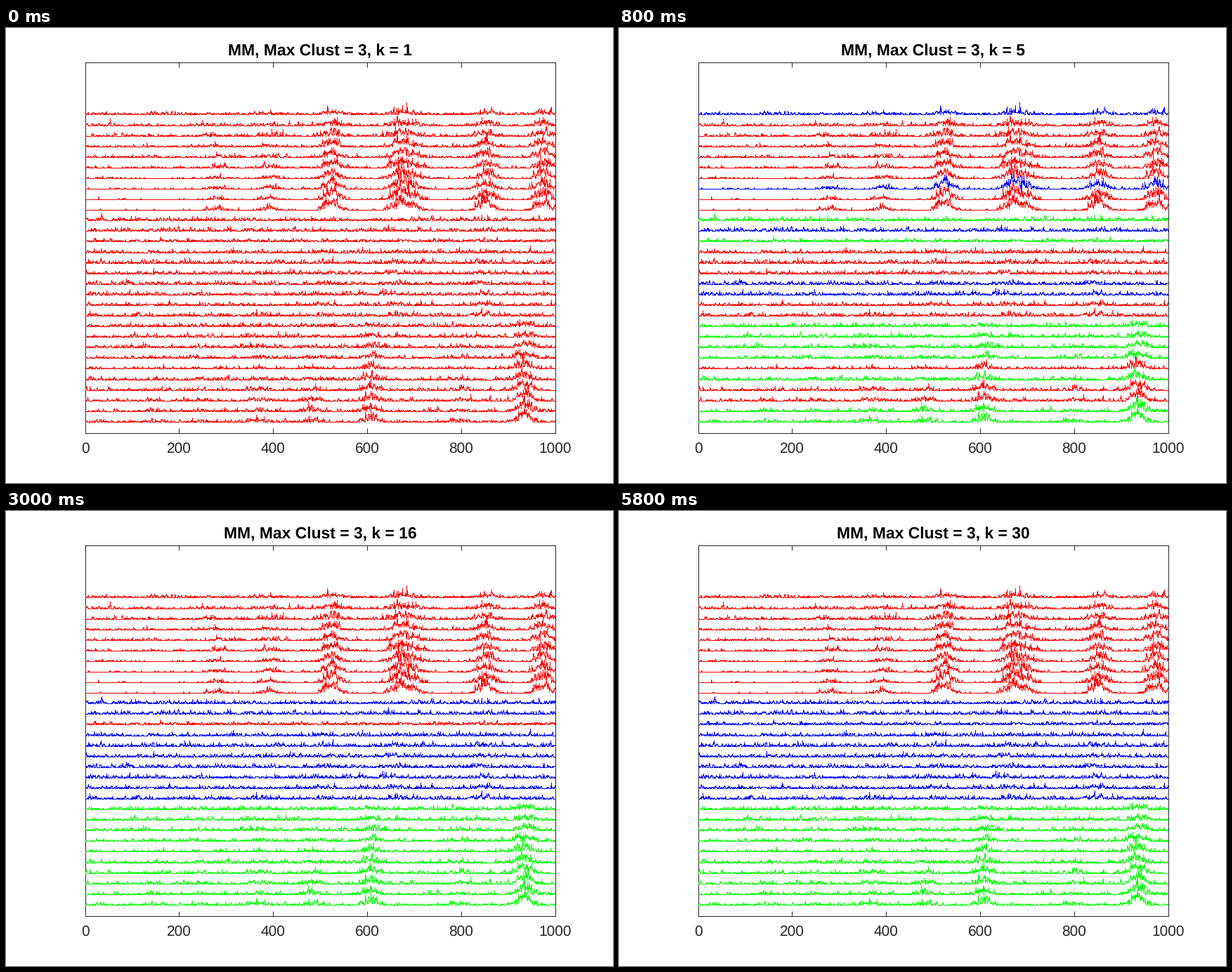
Recreate the animation shown at these times as a matplotlib script. Size 864x648 px, loop 6000 ms.

```python
import numpy as np
import matplotlib.pyplot as plt
from matplotlib.animation import FuncAnimation

W, H, DPI = 864, 648, 150
LEFT, BOTTOM, WIDTH, HEIGHT = 112.5, 71.5, 669, 528  # axes box in pixels
STEPS, INTERVAL = 30, 200
ROWS, SAMPLES, YMAX = 30, 1000, 35
DARK = "#262626"
COLORS = {"R": (1, 0, 0), "G": (0, 1, 0), "B": (0, 0, 1)}

# Cluster labels, top row first, at the iterations where they settle
RED, BLUE, GREEN = "R" * 10, "B" * 10, "G" * 10
KEYS = {
    1: RED * 3,
    2: "GRGRRRRBRR" + "GGGRRGBBGR" + "RBRRRRRRGB",
    5: "BRRRRRRBRR" + "GBGRRRBBRR" + "GGGGRGRRGG",
    7: RED + "BBRRRRBBRR" + GREEN,
    11: RED + "BBRBBBBBBB" + GREEN,
    16: RED + "BBRBBBBBBB" + GREEN,
    17: RED + BLUE + GREEN,
}

# Bump centre and event rate for each group of ten rows
BUMPS = [
    {280: 1.1, 392: 1.8, 525: 6.5, 670: 7, 700: 3, 853: 6, 975: 6},
    {512: 0.6, 660: 0.9, 845: 0.9},
    {145: 0.5, 240: 0.5, 367: 1.2, 482: 1.4, 608: 3.6, 800: 1, 935: 6},
]
SPREAD = 14
EVENT = 0.13  # height of one event, in row spacings

rng = np.random.default_rng(12)
x = np.arange(1, SAMPLES + 1)


def trace(row):
    """Event counts: further down a group, noise gives way to the bumps."""
    group, place = divmod(row, 10)
    weight = 0.3 + 0.7 * place / 9
    bumps = sum(rate * np.exp(-((x - c) / SPREAD) ** 2 / 2)
                for c, rate in BUMPS[group].items())
    noise = max(0.03, 0.65 - 0.6 * weight * bumps.mean())
    return EVENT * rng.poisson(noise + weight * bumps)


def center(v):
    return np.floor(v) + 0.5


def pixel_path(y):
    """Crisp one-pixel outline: each sample meets its neighbours half way."""
    px = center(LEFT + WIDTH * x / SAMPLES)
    py = center(BOTTOM + HEIGHT * y / YMAX)
    mid = center((py[1:] + py[:-1]) / 2)
    before, after = np.r_[py[0], mid], np.r_[mid, py[-1]]
    points = np.column_stack([np.repeat(px, 3),
                              np.column_stack([before, py, after]).ravel()])
    return ax.transData.inverted().transform(points).T


def labels(k):
    """Each row switches to its next label at its own step between two keys."""
    a = max(key for key in KEYS if key <= k)
    b = min((key for key in KEYS if key > k), default=None)
    if b is None:
        return KEYS[a]
    return [new if k - a > row * 7 % (b - a) else old
            for row, (old, new) in enumerate(zip(KEYS[a], KEYS[b]))]


def text(px, py, s, **style):
    return fig.text(px / W, 1 - py / H, s, ha="center", va="baseline", **style)


plt.rcParams.update({"font.family": "Liberation Sans", "text.hinting": "none",
                     "path.simplify": False})
fig = plt.figure(figsize=(W / DPI, H / DPI), dpi=DPI, facecolor="white")
ax = fig.add_axes([LEFT / W, BOTTOM / H, WIDTH / W, HEIGHT / H])
ticks = range(0, SAMPLES + 1, 200)
ax.set(xlim=(0, SAMPLES), ylim=(0, YMAX), yticks=[], xticks=ticks)
ax.tick_params(axis="x", direction="in", top=True, length=3.2, width=0.48,
               color=DARK, labelbottom=False)
for spine in ax.spines.values():
    spine.set(linewidth=0.48, color=DARK)

for value in ticks:
    text(LEFT + WIDTH * value / SAMPLES, 605, str(value), size=10, color=DARK)
title = text(LEFT + WIDTH / 2, 39, "", size=11, weight="bold", color="black")

lines = [ax.plot(*pixel_path(ROWS - row + trace(row)), lw=0.2, snap=False,
                 antialiased=False, clip_on=False, zorder=4 - row / ROWS)[0]
         for row in range(ROWS)]


def update(n):
    k = n + 1
    title.set_text(f"MM, Max Clust = 3, k = {k}")
    for line, label in zip(lines, labels(k)):
        line.set_color(COLORS[label])
    return [title, *lines]


anim = FuncAnimation(fig, update, frames=STEPS, interval=INTERVAL,
                     repeat=True, repeat_delay=0, blit=False)
plt.show()
```
